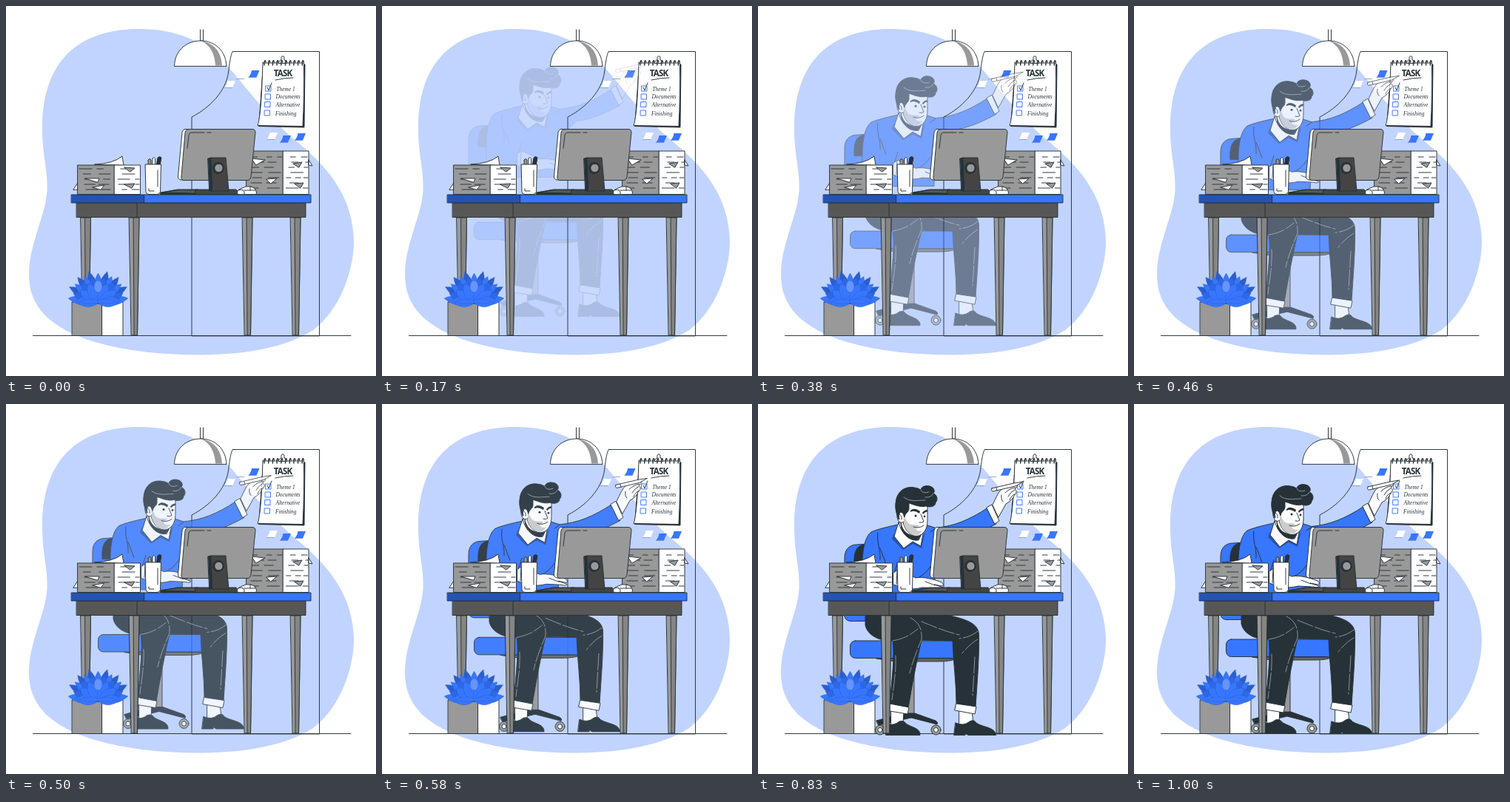
Animation, 500 px wide and 500 px high, one loop 1040 ms. Source, as an HTML page:

```html
<!DOCTYPE html>
<html lang="en">
<head>
<meta charset="utf-8">
<title>Desk worker</title>
<style>
  html, body { margin: 0; width: 100%; height: 100%; overflow: hidden; background: #fff; }
  svg { display: block; width: 100%; height: 100%; }
  .line { stroke: #263238; stroke-width: .95; stroke-linejoin: round; stroke-linecap: round; }
  .no { fill: none; }
  .w { fill: #fff; }
  .g { fill: #999; }
  .b { fill: #3776ff; }
  .db { fill: #2553b4; }
  .k { fill: #263238; }
  .flat { stroke: none; }
  .fold { fill: none; stroke: #b5bcc0; stroke-width: .7; }
  .title { font: bold 11.5px "Open Sans", "Noto Sans", sans-serif; letter-spacing: -.8px; text-anchor: middle; }
  .hand { font: italic 7.4px "Liberation Serif", serif; }
</style>
</head>
<body>
<svg viewBox="0 0 500 500">
  <defs>
    <g id="note">
      <path d="M4.500 0H15L11 9.500H0Q3.500 6 4.500 0Z"/>
      <path d="M0 9.500H11" fill="none" stroke="#7d8fbe" stroke-width=".8"/>
    </g>
    <g id="leg" class="line">
      <path class="g" d="M0 286H13.500L11 445H3Z"/>
      <path fill="#858585" d="M6 286H13.500L11 445H7Z"/>
    </g>
  </defs>

  <path fill="#c1d4ff" d="M180 31C107 31 49 66 49 165C49 205 57 222 55.500 250C53 285 31 322 31 363C31 414 70 438 120 454C165 467 215 471.500 262 471.500C330 471 380 460 415 438C450 412 470 360 470 318C469 262 440 222 395 185C355 152 325 110 300 82C268 46 228 31 180 31Z"/>
  <path class="line no" d="M36.500 445.500H466M251 445.500V150C276 137 297 115 300.500 90C302 78 303 69 306 61.500H423.500V445.500Z"/>

  <g class="line">
    <path class="w" d="M262.500 32V47H266.500V32"/>
    <path class="w" d="M227.500 81C228 61 243 47 263 47C283 47 297 61 298 81Z"/>
    <path class="g flat" d="M264 47.500C283 50 291 64 292 80.500H283C282 64 276 53 264 47.500Z"/>
  </g>

  <use href="#note" x="295" y="101" class="w"/>
  <use href="#note" x="311" y="89" class="w"/>
  <use href="#note" x="327.500" y="87" class="b"/>
  <use href="#note" x="352" y="171" class="w"/>
  <use href="#note" x="370" y="175" class="b"/>
  <use href="#note" x="390" y="172" class="b"/>

  <g class="line">
    <path class="k" d="M348 79H404L403 164L342 162.500Z"/>
    <path class="w" d="M347 77H402.500C403 105 402.500 135 401 162.500L340 161.500C345 147 346 105 347 77Z"/>
    <path class="w" d="M368.500 77Q369 73 372 73V69Q374 66 376 69V73Q379 73 379.500 77Z"/>
    <path id="rings" class="no" style="stroke-width:1.400"/>
    <path class="no" d="M364 100Q377 97 388 97"/>
    <path class="w" style="stroke:#3776ff" d="M351 108h7v7h-7zM350.500 119h7v7h-7zM350 129.500h7v7h-7zM349.500 141h7v7h-7z"/>
    <path class="no" d="M353 110L355 114L359 104"/>
  </g>
  <g class="k">
    <text class="title" x="374" y="94.500">TASK</text>
    <g class="hand">
      <text x="365.500" y="114.500">Theme 1</text>
      <text x="364.500" y="125">Documents</text>
      <text x="364.500" y="136">Alternative</text>
      <text x="364" y="148">Finishing</text>
    </g>
  </g>

  <g id="man" class="line" opacity="0">
    <!-- chair -->
    <path class="b" d="M117 285V206C117 194 124 188 134 188L150 187V291.500H125Q118 291 117 285Z"/>
    <path class="k" d="M130 216C129 198 133 189 144 188H152V216Z"/>
    <path class="g" d="M196 342H211V417H196Z"/>
    <path fill="#666" d="M160 342H268Q262 346 242 346H186Z"/>
    <path class="k" d="M160 426L196 416H212L240 426Q244 428 242 431L207 422L163 432Z"/>
    <g class="g">
      <circle cx="165" cy="438.500" r="6.500"/><circle cx="240.500" cy="438.500" r="6.500"/>
      <circle class="w" cx="165" cy="438.500" r="3"/><circle class="w" cx="240.500" cy="438.500" r="3"/>
    </g>
    <rect class="b" x="124.500" y="318" width="145" height="23.500" rx="7"/>
    <!-- legs -->
    <path class="w" d="M180 411H197L196 431L180 432ZM272 410L289 413L291 429L272 433Z"/>
    <path class="k" d="M173 431Q184 433 191 427Q197 425 200 430C207 435 220 436 219 445.500H173Z"/>
    <path class="k" d="M267 429Q278 434 286 427Q292 424 294 428C301 435 321 434 321.500 445.500H284L280 443V445.500H265Z"/>
    <path class="k" d="M180 282H250C278 288 299 293 298.500 311C299 342 296 375 294 408L268 403C268 375 264 348 263 318L216 317Z"/>
    <path class="k" d="M145 280V297C148 311 165 319 182 318C185 338 181 367 178 404L203 409C208 378 214 347 221 317C223 302 218 291 205 282Z"/>
    <path class="w" d="M178 403L204 408L202 417L178 413ZM268 403L295 407L293 417L266 412Z"/>
    <path class="fold" d="M182 318C200 315 208 308 216 302M206 287C218 293 222 303 221 316C214 333 208 348 205 362M186 338C187 360 183 380 181 398M221 292C240 300 255 306 272 310M297 305C290 311 281 314 272 315M297 316C290 320 283 326 276 335M293 340L290 392" stroke-dasharray="22 3"/>
    <!-- torso and arms -->
    <path class="b" d="M141 257V213C141 192 146 176 153 171Q161 167 189 161H226L240 165.500C265 163 285 155 311 138L322 160C300 172 282 179 262 182L240 205L238 257Z"/>
    <path class="db flat" d="M184 172L181 180L196 195L209 187L221 193L226 171L218 188L209 183L197 191L185 177Z"/>
    <path class="no" d="M162 172C160 187 166 194 165 208M165 193L173 214M240 166L233 171M189 211L183 230M214 234Q226 229 233 218"/>
    <path class="w" d="M183 226L189 222L213 233C224 231 238 235 248 239Q253 243 248 244L238 242L250 246Q249 249 242 247L222 246C207 250 195 247 183 242Z"/>
    <path class="no" d="M226 238L239 243M188 223L187 242"/>
    <path class="w" d="M309 138L316 134L326 156L320 160Z"/>
    <path class="w" d="M317 134C322 125 325 114 333 111L346 106Q352 106 350 110L347 113Q352 116 346 122Q344 128 335 133L325 151Z"/>
    <path class="w" d="M316 112L346 105L358.500 103L348 109L318 116Q314 116 316 112Z"/>
    <path class="no" d="M322 111L323 115M334 118Q341 111 348 111M338 123Q341 117 347 114M340 128Q342 122 347 120M329 121Q328 127 331 130"/>
    <!-- head -->
    <path class="w" d="M192 152L189 170Q200 190 212 184L221 174L224 160Z"/>
    <path class="k" d="M193 158C195 172 205 178 220 176L213 184C201 185 193 174 193 158Z"/>
    <path class="w" d="M190 158L184 177L197 193L209 184L220 190L224 168L217 182C205 184 194 174 190 158Z"/>
    <path class="w" d="M195 138L196 158C199 170 207 177 215 176.500C224 175 229 167 229 155L229 133L204 128Z"/>
    <path fill="#ccc" class="flat" d="M196.500 147L202 158C207 163 211 160 218 162L213 167Q216 171 222 169Q218 175 214 175.500C206 176 199 169 196.500 158Z"/>
    <path class="w" d="M196 146C192 140 187 144 188 151C189 158 194 160 197 157"/>
    <path class="no" d="M191 147Q195 149 194 154M220 147L224 157Q222 159 218 158M210 164Q217 167 224 162"/>
    <path class="k flat" d="M206 142Q211 137 219 143L218 146Q211 141 206 144ZM222 145Q225 141 229 141V143.500Q226 143 223 147Z"/>
    <circle class="k flat" cx="213" cy="149" r="1.500"/><circle class="k flat" cx="225" cy="150" r="1.400"/>
    <path class="k" d="M190 154C187 146 185 139 186 132C187 118 196 110 208 110.500Q216 111 220 114C221 108 231 107 236 111Q240 115 237 119C243 121 243 129 240 131C240 137 232 138 227 136C218 138 211 134 204 132L204 140C203 145 199 145 198 151L196 146C193 142 189 146 191 153Z"/>
    <path class="fold" d="M197 124C205 131 216 128 226 128M220 114Q222 120 231 117M237 119Q234 125 226 124"/>
  </g>

  <!-- paper stacks -->
  <g class="line">
    <path class="w" d="M91 248L97 239V248ZM120 214Q145 213 157 203L159 215Z"/>
    <path class="g" d="M97 215H147V254.500H97Z"/>
    <path class="w" d="M146.500 215H181.500V254.500H146.500Z"/>
    <path class="g" d="M325 196H375V254.500H325Z"/>
    <path class="w" d="M374.500 196H409V254.500H374.500ZM409 208L414 216L409 215Z"/>
    <path id="sheets" class="no"/>
    <path class="w" d="M107 233H126L124 238ZM117 245L133 242L128 248ZM332 206L350 208L338 215ZM352 234L366 233L358 240Z"/>
    <path class="g" d="M160 218L174 219L168 224ZM160 241L174 240L170 246ZM388 213L400 211L396 218ZM390 240L402 239L398 246Z"/>
  </g>

  <!-- cup, monitor, keyboard, mouse -->
  <g class="line">
    <path class="g" d="M192 216V208Q194 205 196 208V216Z"/>
    <path class="w" d="M198 216V206Q200 203 201.500 206V216Z"/>
    <path class="k" d="M203 216L205 205Q208 202 210 205L208 216Z"/>
    <path class="w" d="M188.500 214H209.500L208.500 251Q208 254.500 204 254.500H193Q189 254.500 189 251Z"/>
    <path class="no" d="M193 247V250H200M205 222V244"/>
    <path class="w" d="M246 166.500H241Q239 167 238 171L232.500 230Q232 234.500 237 235H244Z"/>
    <path class="g" d="M247 166.500H333Q337 166.500 337 171L331 231Q330 235.500 326 235.500H240Q236 235 237 230L242 171Q243 166.500 247 166.500Z"/>
    <path class="no" d="M245 192L247 175Q247 171 252 171H268M272 171H277"/>
    <path class="k" d="M209 252L232 248H260V254.500H209Z"/>
    <path fill="#575757" d="M211 252L233 248.500H259L256 253Z"/>
    <path fill="#444" d="M256 248H311L316 254.500H256Z"/>
    <path class="k" d="M273 206L278 205L281 250H275Z"/>
    <path fill="#444" d="M277 205H297L301 250H279Z"/>
    <circle class="k" cx="287" cy="219" r="7.500"/><circle class="g" cx="287.500" cy="219" r="5.700"/>
    <path class="w" d="M313 254.500Q311 249 317 247L324 244Q336 243 338 250Q340 254.500 336 254.500Z"/>
    <path class="no" d="M314 249Q323 246 322 254M322 249H337M330 244V249"/>
  </g>

  <!-- desk -->
  <use href="#leg" x="101"/><use href="#leg" x="166.500"/><use href="#leg" x="319.500"/><use href="#leg" x="384.500"/>
  <g class="line">
    <path fill="#575757" d="M95.500 266H405V285.500H95.500ZM177 266V285.500"/>
    <path class="db" d="M88.500 255H187V266H88.500Z"/>
    <path class="b" d="M187 255H412V266H187Z"/>
  </g>

  <g class="line">
    <path class="g" d="M89.500 400H130V445.500H89.500Z"/>
    <path class="w" d="M130 400H158V445.500H130Z"/>
  </g>
  <g id="plant" transform="translate(124.500 402)" stroke="#2553b4" stroke-width=".3"></g>
</svg>
<script>
const $ = id => document.getElementById(id);

// Notepad binding
let rings = '';
for (let x = 349; x < 402; x += 5.7) rings += `M${x} 80V75Q${x + 1.5} 72 ${x + 2} 76`;
$('rings').setAttribute('d', rings);

// Broken sheet edges on the paper stacks
let seed = 7;
const random = () => (seed = seed * 16807 % 2147483647) / 2147483647;
function sheetEdges(left, right, top) {
  let d = '';
  for (let y = top; y < 252; y += 7) {
    for (let x = left + random() * 10; x < right - 3;) {
      const end = Math.min(right, x + 6 + random() * 12);
      d += `M${x} ${y}H${end}`;
      x = end + 4 + random() * 10;
    }
  }
  return d;
}
$('sheets').setAttribute('d',
  sheetEdges(99, 145, 220) + sheetEdges(148, 180, 220) +
  sheetEdges(327, 373, 204) + sheetEdges(376, 408, 204));

// Petals: colour, length, half width, angles
const petals = [
  ['#2a5fd0', 45, 8, [-60, -38, -16, 16, 38, 60]],
  ['#3776ff', 41, 8, [-80, -50, -27, 0, 27, 50, 80]],
  ['#2f68e6', 36, 9, [-68, -38, -14, 14, 38, 68]],
  ['#3776ff', 30, 9, [-82, -54, -26, 26, 54, 82]]
];
$('plant').innerHTML = petals.map(([fill, len, w, angles]) => angles.map(a =>
  `<path fill="${fill}" transform="rotate(${a})" d="M0 0C${-w} ${-len * .35} ${-w} ${-len * .7} 0 ${-len}C${w} ${-len * .7} ${w} ${-len * .35} 0 0Z"/>`
).join('')).join('') +
  '<path fill="#3776ff" d="M-26 -2Q-12 -9 0 -4Q12 -9 26 -2Q12 2 0 -1Q-12 2 -26 -2Z"/>' +
  '<ellipse cx="0" cy="-23" rx="5.500" ry="8" fill="#6394ff"/>';

const bezier = (a, b, s) => 3 * a * s * (1 - s) ** 2 + 3 * b * s * s * (1 - s) + s ** 3;

// Ease with a slight overshoot
function ease(x) {
  let lo = 0, hi = 1;
  for (let i = 0; i < 24; i++) {
    const mid = (lo + hi) / 2;
    if (bezier(.36, .5, mid) < x) lo = mid; else hi = mid;
  }
  return bezier(-.01, 1.38, lo);
}

const LOOP = 1040, LEAD = 20, DROP = 30;
const start = performance.now();
function draw() {
  const time = (performance.now() - start) % LOOP;
  const p = ease(Math.min(1, (time + LEAD) / 1000));
  $('man').setAttribute('transform', `translate(0 ${DROP * (p - 1)})`);
  $('man').setAttribute('opacity', time < 40 ? 0 : Math.max(0, Math.min(1, p)));
  requestAnimationFrame(draw);
}
draw();
</script>
</body>
</html>
```
